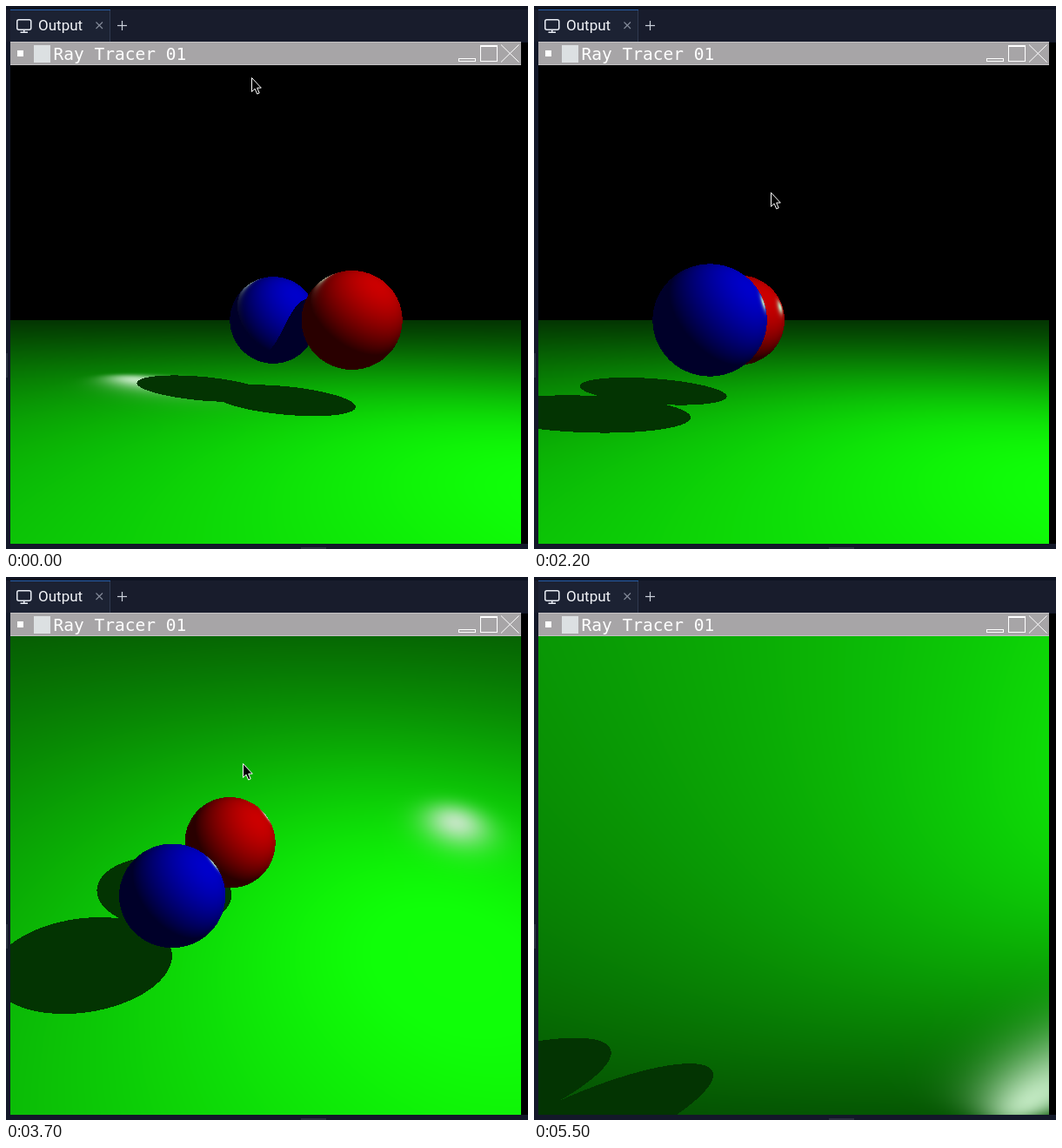
These frames come from a looping animation (600x624 px, 5.6 s). An HTML page with a canvas:

```html
<!DOCTYPE html>
<html>
<head>
<meta charset="utf-8">
<title>Ray Tracer 01</title>
<style>
  html, body { margin: 0; width: 100%; height: 100%; overflow: hidden; background: #131829; }
  canvas { display: block; }
</style>
</head>
<body>
<canvas id="stage" width="600" height="624"></canvas>
<script>
const ctx = document.getElementById('stage').getContext('2d');
const LOOP = 5600, STEP = 100;
const VIEW = { x: 5, y: 68, w: 587, h: 550 };
const FOCAL = 507.5, CENTRE = 293;
const LIGHT = [4.2, 4.2, 4.6];
const AMBIENT = 52, DIFFUSE = 208, SHINE = 24;
const COLORS = [[0, 0, 0.78], [0.78, 0, 0], [0.06, 1, 0.03]];  // two balls, floor

// time, yaw, pitch, pivot x, pivot y, drift of the highlight's eye
const POSES = [
  [0, -39, 0, 0, 0, 0],
  [700, -35, 0, -0.03, 0, 0],
  [1200, -13, 0, -0.1, 0, 0],
  [1500, 0, 0, -0.12, 0, 0],
  [1800, 42, 0, -0.08, 0, 0],
  [2300, 92, 0, 0.04, 0, 0],
  [2800, 93, 0, 0.04, 0, 0],
  [3200, 60, 34, -0.14, -0.04, 0],
  [3700, 60, 42, -0.14, -0.04, 0],
  [4400, 60, 61, -0.14, -0.05, 0],
  [5200, 59, 11.7, -0.15, 0, 0],
  [5500, 48, -35, -0.15, 0, 1]
];
// time, tip x, tip y
const POINTER = [
  [0, 282, 82], [600, 272, 214], [4800, 272, 214], [5200, 367, 84]
];

const image = ctx.createImageData(VIEW.w, VIEW.h);
const pixels = image.data;

function sample(keys, t) {
  let i = 1;
  while (i < keys.length - 1 && keys[i][0] < t) i++;
  const a = keys[i - 1], b = keys[i];
  const k = Math.min(1, (t - a[0]) / (b[0] - a[0]));
  return a.slice(1).map((v, j) => v + (b[j + 1] - v) * k);
}

function makeScene(t) {
  const [yaw, pitch, qx, qy, drift] = sample(POSES, t);
  const a = yaw * Math.PI / 180, p = pitch * Math.PI / 180;
  const ca = Math.cos(a), sa = Math.sin(a), cp = Math.cos(p), sp = Math.sin(p);
  const qz = 8.6;
  const place = (x, z) => {
    const depth = x * sa + z * ca;
    return [qx + x * ca - z * sa, qy + depth * sp, qz + depth * cp];
  };
  return {
    balls: [place(-0.88, 1.38), place(1.12, 1.38)],
    normal: [0, cp, -sp],
    level: cp * qy - sp * qz - 2,
    // the highlight is seen from a point that turns against the balls
    eye: [
      11 * cp * sa + 4.2 * drift,
      11 * sp - 4.7 * drift,
      qz + 0.8 + 11 * cp * ca + 8.7 * drift
    ]
  };
}

// Distance along a unit ray to a unit ball, or Infinity.
function hitBall(ox, oy, oz, dx, dy, dz, ball) {
  const x = ball[0] - ox, y = ball[1] - oy, z = ball[2] - oz;
  const b = x * dx + y * dy + z * dz;
  if (b <= 0) return Infinity;
  const d = b * b - (x * x + y * y + z * z) + 1;
  if (d <= 0) return Infinity;
  const t = b - Math.sqrt(d);
  return t > 0.001 ? t : Infinity;
}

function render(scene) {
  const { balls, normal, level, eye } = scene;
  let o = 0;
  for (let j = 0; j < VIEW.h; j++) {
    for (let i = 0; i < VIEW.w; i++, o += 4) {
      const u = (i + 0.5 - CENTRE) / FOCAL, v = (CENTRE - j - 0.5) / FOCAL;
      const inv = 1 / Math.sqrt(u * u + v * v + 1);
      const dx = u * inv, dy = v * inv, dz = inv;

      let near = Infinity, which = -1;
      const floor = level / (normal[1] * dy + normal[2] * dz);
      if (floor > 0 && floor < 1e5) { near = floor; which = 2; }
      for (let k = 0; k < 2; k++) {
        const t = hitBall(0, 0, 0, dx, dy, dz, balls[k]);
        if (t < near) { near = t; which = k; }
      }

      pixels[o + 3] = 255;
      pixels[o] = pixels[o + 1] = pixels[o + 2] = 0;
      if (which < 0) continue;

      const px = dx * near, py = dy * near, pz = dz * near;
      let nx = 0, ny = normal[1], nz = normal[2];
      if (which < 2) {
        const c = balls[which];
        nx = px - c[0]; ny = py - c[1]; nz = pz - c[2];
      }
      let lx = LIGHT[0] - px, ly = LIGHT[1] - py, lz = LIGHT[2] - pz;
      const ll = 1 / Math.sqrt(lx * lx + ly * ly + lz * lz);
      lx *= ll; ly *= ll; lz *= ll;
      const facing = nx * lx + ny * ly + nz * lz;

      let glow = AMBIENT, spec = 0;
      if (facing > 0) {
        let lit = true;
        for (let k = 0; k < 2 && lit; k++) {
          if (k !== which) lit = hitBall(px, py, pz, lx, ly, lz, balls[k]) === Infinity;
        }
        if (lit) {
          glow += DIFFUSE * facing;
          const ex = eye[0] - px, ey = eye[1] - py, ez = eye[2] - pz;
          const along = ((2 * facing * nx - lx) * ex + (2 * facing * ny - ly) * ey +
            (2 * facing * nz - lz) * ez) / Math.sqrt(ex * ex + ey * ey + ez * ez);
          if (along > 0.7) spec = Math.pow(along, SHINE);
        }
      }
      // the highlight pulls every channel towards a pale grey
      for (let c = 0; c < 3; c++) {
        const base = Math.min(255, glow * COLORS[which][c]);
        pixels[o + c] = base + ((c === 1 ? 230 : 190) - base) * spec;
      }
    }
  }
  ctx.putImageData(image, VIEW.x, VIEW.y);
}

function box(color, x, y, w, h) {
  ctx.fillStyle = color;
  ctx.fillRect(x, y, w, h);
}

function line(color, width, ...points) {
  ctx.strokeStyle = color;
  ctx.lineWidth = width;
  ctx.beginPath();
  for (let i = 0; i < points.length; i += 2) ctx.lineTo(points[i], points[i + 1]);
  ctx.stroke();
}

function label(text, x, y, font, color) {
  ctx.font = font;
  ctx.fillStyle = color;
  ctx.fillText(text, x, y);
}

function drawFrame() {
  box('#131829', 0, 0, 600, 624);
  box('#181c2c', 0, 0, 600, 41);
  box('#0e1322', 0, 0, 600, 4);
  box('#1c2233', 5, 4, 115, 38);
  box('#265ea8', 5, 4, 115, 1);
  box('#303a50', 119, 5, 1, 36);

  ctx.strokeStyle = '#e9edf5';
  ctx.lineWidth = 1.5;
  ctx.beginPath();
  ctx.roundRect(12.75, 15.75, 16, 11.5, 2);
  ctx.stroke();
  line('#e9edf5', 1.5, 20.75, 27, 20.75, 30);
  line('#e9edf5', 1.5, 16.5, 30.25, 25, 30.25);
  label('Output', 37, 28, '17px Roboto, sans-serif', '#f2f4f8');
  line('#858d9c', 1.1, 103.5, 18.5, 111, 26);
  line('#858d9c', 1.1, 111, 18.5, 103.5, 26);
  line('#cbd0da', 1.2, 128, 22.5, 139, 22.5);
  line('#cbd0da', 1.2, 133.5, 17, 133.5, 28);

  box('#000', 592, 42, 8, 576);
  box('#a7a5a7', 5, 42, 587, 26);
  box('#c4c2c4', 5, 41, 587, 1);
  box('#c4c2c4', 5, 67, 587, 1);
  box('#fff', 13, 51, 7, 7);
  box('#dce0e2', 32, 45, 19, 20);
  label('Ray Tracer 01', 54.5, 61.5, '19.5px "DejaVu Sans Mono", monospace', '#fff');

  ctx.strokeStyle = '#fff';
  ctx.lineWidth = 1;
  ctx.strokeRect(520.5, 60.5, 19, 3);
  ctx.strokeRect(545.5, 45.5, 19, 18);
  box('#fff', 545, 45, 20, 2);
  line('#fff', 1, 569, 44.5, 589.5, 64.5);
  line('#fff', 1, 589.5, 44.5, 569, 64.5);

  box('#2b3040', 0, 399, 2, 28);
  box('#2b3040', 339, 622, 29, 2);
}

function drawPointer(t) {
  if (t > 5200) return;
  const [x, y] = sample(POINTER, t).map(Math.round);
  ctx.beginPath();
  for (const [a, b] of [[0, 0], [0, 16], [3.6, 12.6], [6.2, 18.6], [8.7, 17.5], [6.2, 11.6], [10.8, 11.6]]) {
    ctx.lineTo(x + a + 0.5, y + b + 0.5);
  }
  ctx.closePath();
  ctx.fillStyle = '#000';
  ctx.strokeStyle = '#fff';
  ctx.lineWidth = 1;
  ctx.fill();
  ctx.stroke();
}

const start = performance.now();
let shown = -1;
function tick() {
  const t = Math.floor(((performance.now() - start) % LOOP) / STEP) * STEP;
  if (t !== shown) {
    shown = t;
    render(makeScene(t));
    drawPointer(t);
  }
  requestAnimationFrame(tick);
}

drawFrame();
tick();
</script>
</body>
</html>
```
